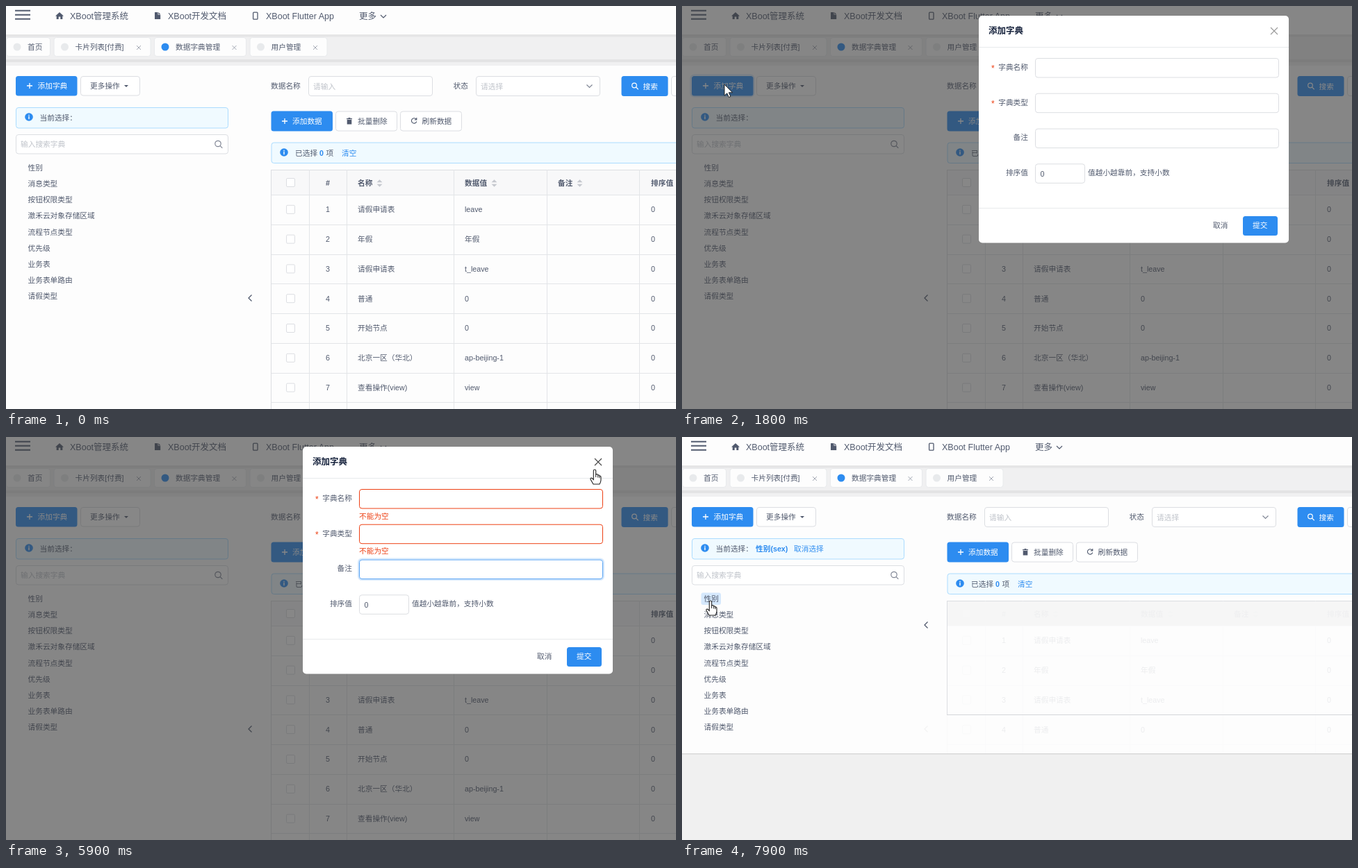
Animation, 964 px wide and 581 px high, one loop 8 s. Source, as an HTML page:

```html
<!DOCTYPE html>
<html lang="zh-CN">
<head>
<meta charset="utf-8">
<style>
  html, body { margin: 0; width: 100%; height: 100%; overflow: hidden; background: #f0f0f0; }
  svg { display: block; }
  text { font-family: "Liberation Sans", "Noto Sans CJK SC", "Noto Sans CJK", sans-serif; white-space: pre; }
</style>
</head>
<body>
<svg id="stage" width="964" height="581" viewBox="0 0 964 581"></svg>
<script>
const BLUE = '#2d8cf0', INK = '#515a6e', LINE = '#dcdee2', PALE = '#bfc3ca', RED = '#ed4014', PAGE = '#fdfdfd';
const $ = id => document.getElementById(id);

// Drawing helpers; text is placed by the middle of its line.
const text = (x, cy, s, { size = 10.7, fill = INK, extra = '' } = {}) =>
  `<text x="${x}" y="${cy + size * .37}" font-size="${size}" fill="${fill}" ${extra}>${s}</text>`;
const bold = 'font-weight="bold"', mid = 'text-anchor="middle"', end = 'text-anchor="end"';
const rect = (x, y, w, h, fill, extra = '') =>
  `<rect x="${x}" y="${y}" width="${w}" height="${h}" fill="${fill}" ${extra}/>`;
const box = (x, y, w, h, fill = '#fff', stroke = LINE, extra = '') =>
  rect(x + .5, y + .5, w - 1, h - 1, fill, `rx="3.5" stroke="${stroke}" ${extra}`);
const path = (d, stroke = INK, width = 1.2, fill = 'none') =>
  `<path d="${d}" fill="${fill}" stroke="${stroke}" stroke-width="${width}"/>`;
const dot = (x, y, r, fill) => `<circle cx="${x}" cy="${y}" r="${r}" fill="${fill}"/>`;
const hline = (x, y, w, color = '#e3e5e8') => rect(x, y, w, 1, color);
const vline = (x, y, h, color = '#e3e5e8') => rect(x, y, 1, h, color);
const group = (id, body, extra = '') => `<g id="${id}" ${extra}>${body}</g>`;

const plus = (x, y) => path(`M${x - 4} ${y}h8M${x} ${y - 4}v8`, '#fff', 1.3);
const cross = (x, y, r, color, w = 1) => path(`M${x - r} ${y - r}l${2 * r} ${2 * r}m0 ${-2 * r}l${-2 * r} ${2 * r}`, color, w);
const down = (x, y, color = INK) => path(`M${x - 4} ${y - 2}l4 4 4-4`, color);
const lens = (x, y, r, color) =>
  `<circle cx="${x - 1}" cy="${y - 1}" r="${r}" fill="none" stroke="${color}" stroke-width="1.2"/>` +
  path(`M${x + r * .7 - 1} ${y + r * .7 - 1}l3.4 3.4`, color);
const info = (x, y) => dot(x, y, 5.8, BLUE) + rect(x - .7, y - 3.2, 1.4, 1.5, '#fff') + rect(x - .7, y - 1, 1.4, 4.2, '#fff');
const sorter = (x, y) => path(`M${x - 4} ${y - 1.2}l4-4 4 4zM${x - 4} ${y + 1.2}l4 4 4-4z`, 'none', 0, '#c5c8ce');
const check = y => rect(403.5, y - 6, 12, 12, '#fff', `rx="1.5" stroke="${LINE}"`);
const chevron = y => path(`M353.5 ${y - 4.5}l-4.5 4.5 4.5 4.5`, INK, 1.3);

function header() {
  const item = (x, s) => text(x, 14.5, s, { size: 12.5 });
  const bars = [6, 12, 18].map(y => rect(13, y - .3, 22, 2, INK)).join('');
  const icons = path('M71 14.5L77 9l6 5.5h-1.7V19h-3v-3.4h-2.6V19h-3v-4.5z', 'none', 0, INK) +
    path('M214 9h4.5v3.5h3.7V19H214zM219.3 9l3 2.8h-3z', 'none', 0, INK) +
    rect(355.6, 9.2, 6.4, 10, 'none', `rx="1" stroke="${INK}" stroke-width="1.3"`);
  return rect(0, 0, 964, 41, PAGE) + bars + icons + item(92, 'XBoot管理系统') +
    item(233, 'XBoot开发文档') + item(374, 'XBoot Flutter App') + item(508, '更多') + down(543, 15);
}

function tabs() {
  const tab = (x, w, s, active) => box(x, 45, w, 28, PAGE, '#e8eaec') +
    dot(x + 16, 59, 5.5, active ? BLUE : '#e8eaec') + text(x + 31, 59, s) +
    (x > 0 ? cross(x + w - 17.5, 60, 3, '#a3a8b3') : '');
  return rect(0, 41, 964, 45, '#f0f0f1') + rect(0, 41, 964, 3.5, '#e5e5e6') + rect(0, 77, 964, 4, '#e3e3e4') +
    tab(0, 64, '首页') + tab(68.5, 140, '卡片列表[付费]') + tab(213, 133, '数据字典管理', true) + tab(350.5, 112, '用户管理');
}

function sidebar() {
  const names = ['性别', '消息类型', '按钮权限类型', '澈禾云对象存储区域', '流程节点类型', '优先级', '业务表', '业务表单路由', '请假类型'];
  const blue = { fill: BLUE };
  return rect(12.5, 99.5, 91, 31, 'none', 'id="addGlow" rx="5" stroke="#2d8cf0" stroke-opacity=".2" stroke-width="2"') +
    rect(14, 101, 88.5, 28.5, BLUE, 'id="add" rx="3.5"') + plus(34, 115) + text(45.5, 115, '添加字典', { fill: '#fff' }) +
    box(107, 101, 86, 28.5) + text(121, 115, '更多操作') + path('M170 114h6l-3 3z', 'none', 0, INK) +
    box(14, 146, 306, 30.5, '#f0faff', '#abdcff') + info(33, 160) + text(48.5, 161, '当前选择：') +
    group('picked', text(106, 161, '性别(sex)', { ...blue, extra: bold }) + text(161, 161, '取消选择', blue)) +
    box(14, 185, 306, 28.5) + text(21, 199, '输入搜索字典', { fill: PALE }) + lens(306, 199.5, 4.2, '#808695') +
    rect(27.5, 224.5, 28.5, 17.5, '#d5e8fc', 'id="nodeHover" rx="3"') +
    names.map((s, i) => text(31.5, 233 + 23.15 * i, s)).join('');
}

function toolbar() {
  const white = { fill: '#fff' }, pale = { fill: PALE };
  return text(381, 115, '数据名称') + box(435, 101, 179, 29) + text(442, 116, '请输入', pale) +
    text(643.5, 115, '状态') + box(676, 101, 179, 29) + text(683, 116, '请选择', pale) + down(839.5, 115.5, '#808695') +
    rect(885.5, 101, 67, 29, BLUE, 'rx="3.5"') + lens(905, 115.5, 3.3, '#fff') + text(916.5, 116, '搜索', white) + box(957, 101, 40, 29) +
    rect(381.5, 151.5, 88.5, 29, BLUE, 'rx="3.5"') + plus(401, 166) + text(412, 166, '添加数据', white) +
    box(474, 151.5, 89, 29) + path('M490 162h8v1.3h-8zM492.5 161h3v1h-3zM490.7 164h6.6v6.5h-6.6z', 'none', 0, INK) + text(506, 166, '批量删除') +
    box(567, 151.5, 89, 29) + path('M590.3 163.5a3.7 3.7 0 1 0 .4 3M590.8 161v3h-3', INK, 1.1) + text(598.5, 166, '刷新数据') +
    box(381.5, 196.5, 600, 30.5, '#f0faff', '#abdcff') + info(400, 211) + text(416, 212, '已选择') +
    text(451, 212, '0', { fill: BLUE, extra: bold }) + text(460.5, 212, '项') + text(483, 212, '清空', { fill: BLUE });
}

function table() {
  const rows = [['请假申请表', 'leave'], ['年假', '年假'], ['请假申请表', 't_leave'], ['普通', '0'],
    ['开始节点', '0'], ['北京一区（华北）', 'ap-beijing-1'], ['查看操作(view)', 'view']];
  const head = (x, s, extra = '') => text(x, 255, s, { extra: bold + ' ' + extra });
  return rect(381.5, 236, 583, 36, '#f8f8f9') + check(254.5) + head(463, '#', mid) +
    head(506, '名称') + sorter(537.5, 255.5) + head(660, '数据值') + sorter(702.5, 255.5) +
    head(794, '备注') + sorter(825.5, 255.5) + head(928, '排序值') +
    rows.map(([name, value], i) => {
      const y = 293.3 + 42.8 * i;
      return check(y) + text(463, y, i + 1, { extra: mid }) + text(506, y, name) + text(660, y, value) +
        text(928, y, '0') + hline(381, Math.round(y + 21.4), 583);
    }).join('') +
    hline(381, 236, 583, LINE) + hline(381, 272, 583) +
    [436, 490, 644, 778, 911].map(x => vline(x, 236, 345)).join('') + vline(381, 236, 345, LINE);
}

const fieldY = [75, 125.7, 176.6];
function modal() {
  const label = (cy, s) => text(498, cy, s, { extra: end });
  const star = cy => text(445, cy + 2, '*', { size: 12, fill: RED });
  const error = (i, cy) => group('error' + i, text(508, cy, '不能为空', { fill: RED }));
  return rect(427, 14, 446, 327.5, '#fff', 'rx="5"') + hline(427, 59, 446, '#e8eaec') + hline(427, 291, 446, '#e8eaec') +
    text(441, 35.5, '添加字典', { size: 12.5, fill: '#17233d', extra: bold }) +
    group('close', cross(852, 36, 5, 'currentColor', 1.1)) +
    star(88) + label(88, '字典名称') + star(139) + label(139, '字典类型') + label(189.5, '备注') + label(240.5, '排序值') +
    rect(507, 0, 353, 30.5, 'none', 'id="glow" rx="5" stroke="#2d8cf0" stroke-opacity=".2" stroke-width="2"') +
    fieldY.map((y, i) => box(508, y, 351, 28.5, '#fff', LINE, `id="field${i}"`)).join('') +
    rect(515.5, 0, 1, 13, '#333', 'id="caret"') + error(0, 114) + error(1, 164.5) +
    box(508, 227.3, 72, 28.5) + text(515.5, 242, '0') + text(584, 240.5, '值越小越靠前，支持小数') +
    text(764, 316.5, '取消') + rect(807, 303, 50, 28, BLUE, 'rx="3.5"') + text(821, 316.5, '提交', { fill: '#fff' });
}

const cursors = {
  arrow: path('M0 0V16.3L3.8 12.8 6.4 18.6 8.9 17.5 6.4 11.8H11.6Z', '#222', 1, '#fff'),
  hand: path('M-1.7 1.7Q-1.7 0 0 0T1.7 1.7V7Q4.3 6 4.7 8Q6.8 7.3 7 9.2Q9 8.8 9 10.8V15Q9 17.5 7 21H-2L-6 14Q-6.5 11.5-4 12.3L-1.7 14.5Z', '#222', 1.1, '#fff') +
    path('M1.7 7v4M4.7 8v3.5M7 9.2v3', '#222', 1),
  beam: path('M-3.5-7.5h2.5l1 1 1-1h2.5M0-6.5v13M-3.5 7.5h2.5l1-1 1 1h2.5', '#222', 1.2)
};

$('stage').innerHTML =
  rect(0, 0, 964, 581, '#f0f0f0') + header() + tabs() + rect(0, 86, 964, 495, PAGE) + sidebar() + toolbar() + table() +
  group('chevron', chevron(421)) + rect(381, 237, 583, 344, PAGE, 'id="veil"') +
  group('short', rect(0, 456, 964, 125, '#f0f0f0') + rect(0, 456, 964, 1.5, '#d9d9d9') + hline(381, 400, 583, '#d4d6da') +
    rect(382, 237, 582, 35, '#f3f3f4', 'opacity=".6"') + vline(381, 236, 164, LINE) + chevron(271)) +
  rect(0, 0, 964, 581, 'rgb(55,55,55)', 'id="mask"') + group('modal', modal()) +
  Object.entries(cursors).map(([id, body]) => group(id, body)).join('');

// Pointer path: time, x, y
const route = [[400, 0, 178], [1200, 61, 113], [1900, 61, 113], [2300, 165, 114], [2500, 546, 92], [2700, 546, 92],
  [2900, 543, 143], [3000, 538, 161], [3300, 542, 142], [4000, 542, 142], [4400, 533, 192], [5100, 533, 192],
  [5900, 847, 47], [6100, 852, 46], [6200, 853, 45], [6700, 853, 45], [7300, 36, 239], [7400, 36, 239], [7600, 41, 236], [8000, 41, 236]];
const clamp = v => Math.min(1, Math.max(0, v));
const easeOut = p => 1 - (1 - p) ** 1.6;
const show = (id, on) => $(id).setAttribute('opacity', +on);
const within = (v, a, b) => v >= a && v <= b;

function pointer(t) {
  const i = Math.max(1, route.findIndex(k => k[0] >= t));
  const [t0, x0, y0] = route[i - 1], [t1, x1, y1] = route[i];
  const p = clamp((t - t0) / (t1 - t0)), s = p * p * (3 - 2 * p);
  return [x0 + (x1 - x0) * s, y0 + (y1 - y0) * s];
}

function shape(t, x, y) {
  if (within(t, 1300, 6700)) {
    if (within(x, 840, 864) && within(y, 22, 50)) return 'hand';
    return within(x, 508, 859) && fieldY.some(f => within(y, f, f + 28.5)) ? 'beam' : 'arrow';
  }
  const onAdd = within(x, 14, 102) && within(y, 101, 129), onNode = within(x, 28, 56) && within(y, 224, 245);
  return onAdd || onNode ? 'hand' : 'arrow';
}

function draw(t) {
  const enter = clamp((t - 1465) / 300), leave = clamp((t - 6495) / 300);
  const shown = easeOut(enter) - easeOut(leave), scale = .9 + .1 * shown;
  show('mask', 1);
  $('mask').setAttribute('opacity', .6 * (enter - leave));
  $('modal').setAttribute('opacity', shown);
  $('modal').setAttribute('transform', `translate(650 177.5) scale(${scale}) translate(-650 -177.5)`);

  const [x, y] = pointer(t), kind = shape(t, x, y);
  for (const id in cursors) {
    show(id, t >= 400 && id === kind);
    $(id).setAttribute('transform', `translate(${Math.round(x)} ${Math.round(y)})`);
  }

  const overAdd = kind === 'hand' && t < 1300 || within(t, 1300, 1700);
  $('add').setAttribute('fill', overAdd ? '#57a3f3' : BLUE);
  show('addGlow', within(t, 1300, 2400));
  $('close').style.color = kind === 'hand' && within(t, 5000, 6800) ? '#444' : '#999';

  const starts = [2500, 3400, 4400, 6400];
  const focus = t < starts[3] ? starts.filter(s => s <= t).length - 1 : -1;
  const errors = [t >= starts[1], t >= starts[2], false];
  fieldY.forEach((_, i) => $('field' + i).setAttribute('stroke', errors[i] ? RED : i === focus ? '#57a3f3' : LINE));
  show('error0', errors[0]);
  show('error1', errors[1]);
  show('glow', focus >= 0);
  show('caret', focus >= 0 && (t - starts[focus]) % 1000 < 500);
  if (focus >= 0) {
    $('glow').setAttribute('y', fieldY[focus] - 1);
    $('caret').setAttribute('y', fieldY[focus] + 8);
  }

  show('nodeHover', t >= 7300);
  show('picked', t >= 7800);
  $('veil').setAttribute('opacity', t >= 7900 ? .9 : t >= 7800 ? .5 : 0);
  show('short', t >= 7900);
  $('chevron').setAttribute('opacity', t >= 7900 ? .06 : 1);
}

function tick() {
  draw(Math.floor(performance.now() % 8000 / 100) * 100);
  requestAnimationFrame(tick);
}
tick();
</script>
</body>
</html>
```
